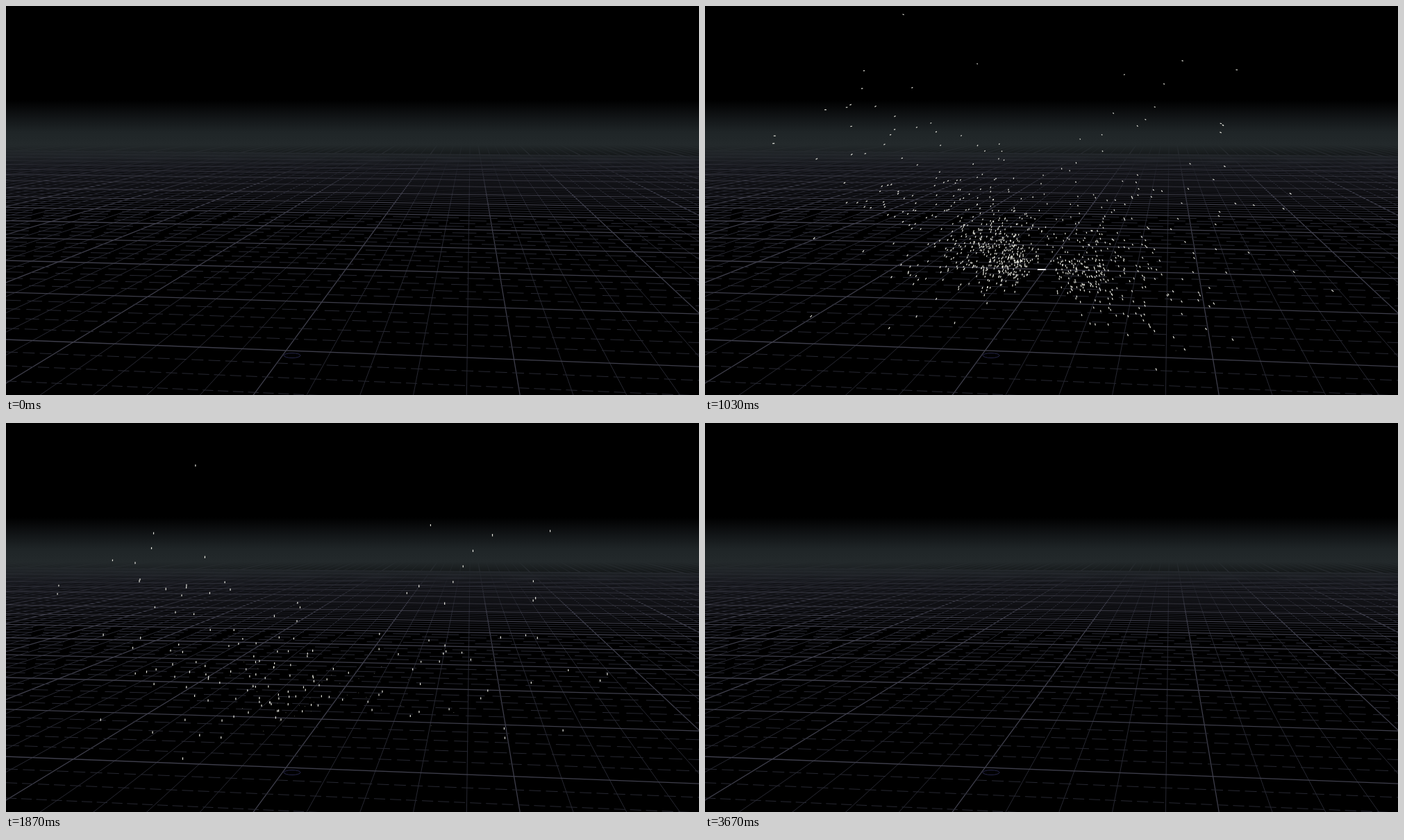
Animation, 998 px wide and 561 px high, one loop 3.71 s. Source, as an HTML page with a canvas:

```html
<!DOCTYPE html>
<html lang="en">
<head>
<meta charset="utf-8">
<title>Particle burst over a grid</title>
<style>
html, body { margin: 0; width: 100%; height: 100%; overflow: hidden; background: #000; }
canvas { position: absolute; left: 0; top: 0; display: block; }
</style>
</head>
<body>
<canvas id="floor" width="998" height="561"></canvas>
<canvas id="sparks" width="998" height="561"></canvas>
<script>
const W = 998, H = 561, LOOP = 3710, COUNT = 1000;
const HORIZON = 135, VANISH_X = 669, VANISH_LEFT = 8850;
const EMIT = { x: 485, y: 377 };
const context = id => document.getElementById(id).getContext('2d');

function line(g, x1, y1, x2, y2) {
  g.beginPath();
  g.moveTo(x1, y1);
  g.lineTo(x2, y2);
  g.stroke();
}

function drawFloor(g) {
  const pen = major => {
    g.strokeStyle = major ? '#3e3e4b' : '#272832';
    g.lineWidth = major ? 1.3 : 1;
  };

  // lines running away from the viewer
  for (let k = -55; k <= 35; k++) {
    const dx = 357 + 76.6 * k - VANISH_X;
    pen(k % 5 === 0);
    line(g, VANISH_X + dx * 0.15, HORIZON + 425 * 0.15, VANISH_X + dx * 1.01, HORIZON + 425 * 1.01);
  }

  // lines running across, all meeting far to the left
  for (let j = -6; j <= 75; j++) {
    const d = 1 / (0.00289 + 0.000142 * j), period = VANISH_LEFT / d;
    const major = j % 5 === 0;
    pen(major);
    g.setLineDash(major || j > 25 ? [] : [period * 0.7, period * 0.3]);
    line(g, 0, HORIZON + d, W, HORIZON + d * (1 + W / VANISH_LEFT));
  }
  g.setLineDash([]);

  const haze = g.createLinearGradient(0, 0, 0, H);
  const stops = [[0, '#000'], [136, '#000'], [160, '#111416'], [182, '#1f2527'], [200, '#23292b'],
    [216, 'rgba(29,34,36,.7)'], [232, 'rgba(12,14,16,.4)'], [275, 'rgba(0,0,0,0)']];
  for (const [y, c] of stops) haze.addColorStop(y / H, c);
  g.fillStyle = haze;
  g.fillRect(0, 0, W, H);

  g.strokeStyle = '#26264a';
  g.lineWidth = 1;
  g.beginPath();
  g.ellipse(412, 504, 12, 3.5, 0, 0, Math.PI * 2);
  g.stroke();
}

let seed = 7291;
function rand() {
  seed = seed + 0x6D2B79F5 | 0;
  let t = Math.imul(seed ^ seed >>> 15, 1 | seed);
  t = t + Math.imul(t ^ t >>> 7, 61 | t) ^ t;
  return ((t ^ t >>> 14) >>> 0) / 4294967296;
}
const expo = mean => -mean * Math.log(1 - rand());
const bell = () => (rand() + rand() + rand() - 1.5) * 2;

// share of the launch distance covered, and seconds of free fall, at an age
const reach = a => 1 - 0.36 * Math.exp(-4 * a) - 0.64 * Math.exp(-20 * a);
const drop = a => a - (1 - Math.exp(-4 * a)) / 4;

const nearRange = () => 24 + expo(45) + expo(45);
const farRange = () => 150 + 310 * rand();
const nearLife = () => Math.min(0.35 + expo(1.1), 1.3 + 0.5 * rand());
const farLife = () => 1.5 + 1.4 * rand();

const LOBES = [
  { share: 0.52, angle: 144, spread: 19, range: nearRange, life: nearLife },
  { share: 0.33, angle: 17, spread: 25, range: nearRange, life: nearLife },
  { share: 0.09, angle: 88, spread: 35, range: nearRange, life: nearLife },
  { share: 0.04, angle: 143, spread: 12, range: farRange, life: farLife },
  { share: 0.02, angle: 25, spread: 22, range: farRange, life: farLife }
];

function spark(dx, up, life) {
  const r = Math.hypot(dx, up);
  const depth = r * 0.35 * (rand() * 1.4 - 0.4);
  const v = 95 + depth * 0.3;
  return {
    dx, dy: depth * 0.5 - up, v, life,
    delay: 0.1 * rand() * Math.exp(-r / 120),
    land: Math.max(up + depth, 15 + 60 * rand()) / v + 0.24
  };
}

function lobeSpark() {
  let pick = rand();
  const lobe = LOBES.find(l => (pick -= l.share) < 0) || LOBES[0];
  const a = (lobe.angle + lobe.spread * bell()) * Math.PI / 180;
  const r = lobe.range();
  return spark(r * Math.cos(a), r * Math.sin(a), lobe.life());
}

// the highest flyers, then the random crowd
const HIGH = [[216, 410], [-199, 345], [147, 307], [-192, 262]];
const sparks = HIGH.map(([dx, up]) => spark(dx, up, 2.4));
while (sparks.length < COUNT) sparks.push(lobeSpark());

function place(p, a) {
  const h = reach(a);
  return [EMIT.x + p.dx * h, EMIT.y + p.dy * h + p.v * drop(a)];
}

function drawEmitter(g, age) {
  if (age > 0.55) return;
  const h = Math.max(1.8, Math.min(8, 8 - (age - 0.18) * 26));
  const inset = h * 0.4;
  g.fillStyle = '#fff';
  g.beginPath();
  g.moveTo(478.5, 381);
  g.lineTo(478.5 + inset, 381 - h);
  g.lineTo(491 - inset, 381 - h);
  g.lineTo(491.5, 381);
  g.fill();
}

function drawSparks(g, age) {
  g.clearRect(0, 0, W, H);
  if (age <= 0) return;
  g.lineWidth = 1.2;
  g.lineCap = 'square';
  g.strokeStyle = '#e6e6de';
  for (const p of sparks) {
    const a = age - p.delay;
    if (a <= 0 || a > p.life) continue;
    if (a < p.land) {
      line(g, ...place(p, Math.max(0, a - 0.018)), ...place(p, a));
    } else if (a < p.land + 0.2) {
      g.fillStyle = '#55554c';
      g.fillRect(...place(p, p.land), 1, 1);
    }
  }
  drawEmitter(g, age);
}

drawFloor(context('floor'));
const air = context('sparks');
const start = performance.now();
let last = -1;

function tick() {
  const t = (performance.now() - start) % LOOP;
  const step = Math.floor((t + 8) * 0.03);
  if (step !== last) {
    last = step;
    drawSparks(air, (step - 17.5) / 30);
  }
  requestAnimationFrame(tick);
}
tick();
</script>
</body>
</html>
```
